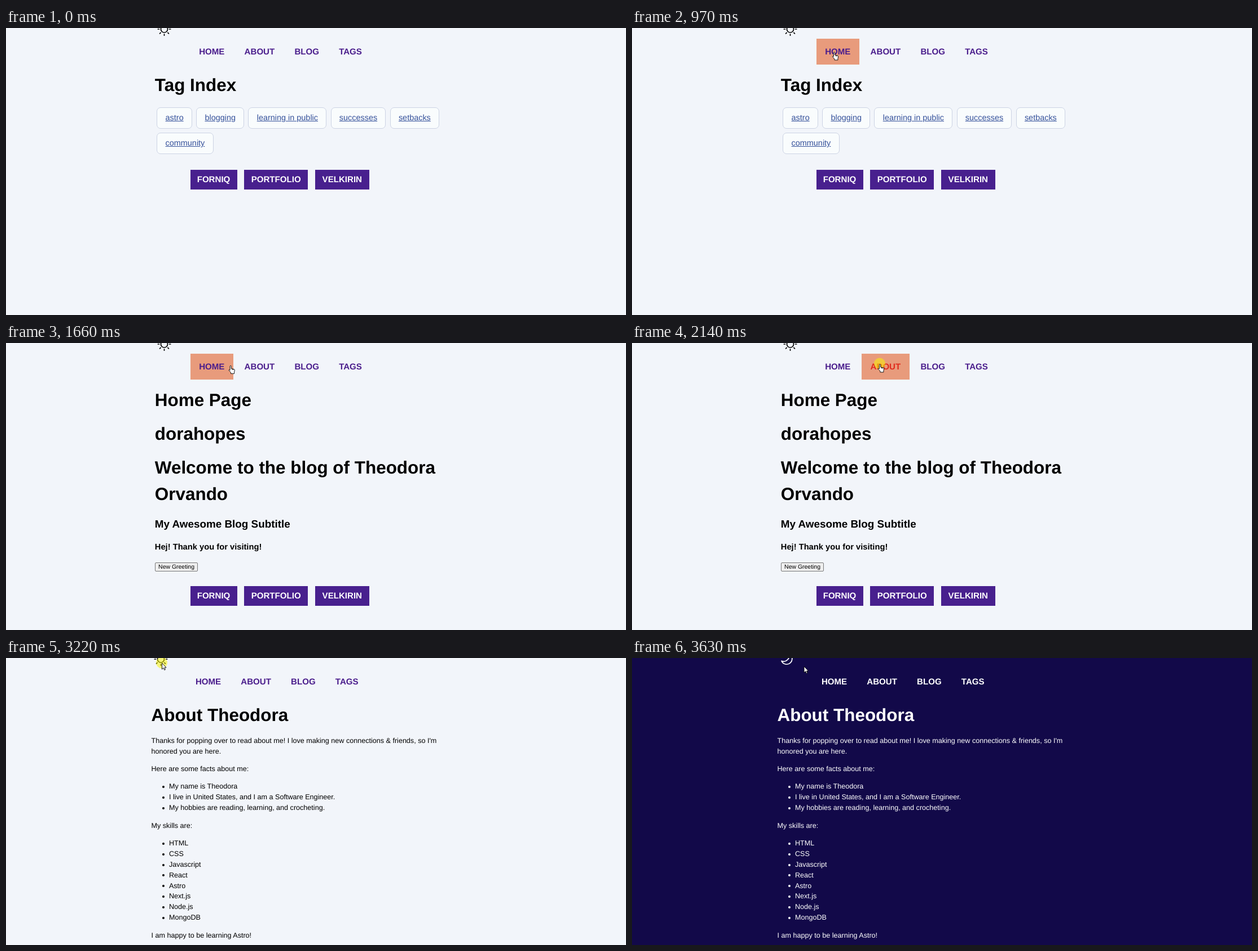
An HTML page for the animation above (3700 ms loop, 1099x510 px).

```html
<!DOCTYPE html>
<html lang="en">
<head>
<meta charset="utf-8">
<title>Blog walkthrough</title>
<style>
  html, body { margin: 0; width: 100%; height: 100%; overflow: hidden; }
  body {
    --ink: #000; --link: #4a1d8c;
    position: relative; background: #f2f5fa; color: var(--ink);
    font: 12.58px/1.5 "Liberation Sans", Arial, sans-serif;
    text-rendering: geometricPrecision;
  }
  body.dark { --ink: #fff; --link: #fff; background: #120949; }
  #page { position: absolute; left: 0; top: 0; width: 1099px; height: 510px; }
  svg { position: absolute; left: 0; top: 0; width: 1099px; height: 510px; overflow: hidden; }
  .icon { fill: none; stroke: var(--ink); stroke-width: 1.7; stroke-linecap: round; stroke-linejoin: round; }
  .dark #sun, body:not(.dark) #moon { display: none; }

  nav, footer { position: absolute; left: 326.5px; display: flex; font-size: 15.08px; font-weight: bold; }
  nav { top: 19.2px; height: 46px; gap: 3.8px; line-height: 47.2px; color: var(--link); }
  nav a { padding: 0 15.7px; }
  nav .hover { background: #e89b7c; }
  nav .active { color: #e02a1c; }
  footer { gap: 12.8px; line-height: 35px; color: #fff; }
  footer a { background: #48208e; text-align: center; }

  main { position: absolute; left: 263.8px; top: 78px; width: 520px; white-space: nowrap; }
  h1 { font-size: 2.5em; margin: 0 0 12.58px; }
  h2 { font-size: 1.5em; margin: 16px 0; }
  h3 { font-size: 1.17em; margin: 0; }
  p, ul { margin: 1em 0; }
  ul { padding-left: 2.5em; list-style: none; }
  li { position: relative; }
  li::before {
    content: ""; position: absolute; left: -11.5px; top: 7.8px;
    width: 4px; height: 4px; border-radius: 50%; background: var(--ink);
  }
  .tags { position: absolute; left: 3.5px; top: 63px; display: flex; flex-wrap: wrap; gap: 7.2px; }
  .tags a {
    padding: 0 14.3px; border: 1px solid #ccd3e4; border-radius: 7px; background: #f9fcfd;
    color: #34509a; font-size: 14.43px; line-height: 36px; text-decoration: underline;
  }
  .greet {
    position: absolute; left: 0; top: 312px; box-sizing: border-box; width: 76.5px; height: 16px;
    border: 1px solid #767676; border-radius: 2px; background: #efefef; color: #000;
    font-size: 10.46px; line-height: 15.5px; text-align: center;
  }
</style>
</head>
<body>
<div id="page">
  <svg class="icon">
    <g id="sun" transform="translate(280.5 2)"><circle r="6"/></g>
    <path id="moon" transform="translate(292.8 -9.8) scale(-1 1)" d="M21.75 15A9.75 9.75 0 1 1 9 2.25 9.75 9.75 0 0 0 21.75 15z"/>
  </svg>
  <nav><a>HOME</a><a>ABOUT</a><a>BLOG</a><a>TAGS</a></nav>

  <main id="tags">
    <h1>Tag Index</h1>
    <div class="tags"><a>astro</a><a>blogging</a><a>learning in public</a><a>successes</a><a>setbacks</a><a>community</a></div>
  </main>

  <main id="home">
    <h1>Home Page</h1>
    <h1>dorahopes</h1>
    <h1>Welcome to the blog of Theodora<br>Orvando</h1>
    <h2>My Awesome Blog Subtitle</h2>
    <h3>Hej! Thank you for visiting!</h3>
    <div class="greet">New Greeting</div>
  </main>

  <main id="about">
    <h1>About Theodora</h1>
    <p>Thanks for popping over to read about me! I love making new connections &amp; friends, so I'm<br>honored you are here.</p>
    <p>Here are some facts about me:</p>
    <ul>
      <li>My name is Theodora</li>
      <li>I live in United States, and I am a Software Engineer.</li>
      <li>My hobbies are reading, learning, and crocheting.</li>
    </ul>
    <p>My skills are:</p>
    <ul><li>HTML</li><li>CSS</li><li>Javascript</li><li>React</li><li>Astro</li><li>Next.js</li><li>Node.js</li><li>MongoDB</li></ul>
    <p>I am happy to be learning Astro!</p>
  </main>

  <footer><a style="width:83px">FORNIQ</a><a style="width:112.7px">PORTFOLIO</a><a style="width:96px">VELKIRIN</a></footer>
</div>

<svg>
  <g id="pointer">
    <circle id="click" cx="-.5" cy="-.5" r="10" fill="#faf500" fill-opacity=".52"/>
    <g fill="#fff" stroke="#000" stroke-width=".9" stroke-linejoin="round">
      <path id="arrow" d="M0 0V11L2.6 8.6 4.3 12.4 6 11.6 4.4 8H7.6Z"/>
      <path id="hand" transform="translate(-3.6 .4)" d="M2.5 1.5a1.1 1.1 0 0 1 2.2 0V5.5L9.5 6.6Q10.8 7 10.8 8.3L10 12V14.5H4V12.5L.6 8.8Q.3 7.4 1.6 7.6L2.5 8.5ZM6.4 6v2M8.3 6.4v1.8"/>
    </g>
  </g>
</svg>

<script>
const LOOP = 3700, HOVER_LAG = 70;
const $ = id => document.getElementById(id);
const show = (el, on) => { el.style.display = on ? '' : 'none'; };
const links = [...document.querySelectorAll('nav a')];
const footer = document.querySelector('footer');

// Pointer moves: first step, last step, number of steps, end point
const START = [1064, 496];
const moves = [
  [70, 590, 8, 505, 27],
  [660, 970, 5, 358.5, 42],
  [1520, 1990, 7, 439.5, 37],
  [2370, 2610, 4, 378, 32],
  [2690, 2990, 5, 276.5, 9],
  [3540, 3630, 2, 305, 15]
];
// Mouse presses: start, page response, end
const clicks = [[1120, 1195, 1270], [2140, 2230, 2300], [3150, 3310, 3310]];

$('sun').insertAdjacentHTML('beforeend', Array.from({ length: 8 }, (_, i) =>
  `<path d="M9 0H11.2" transform="rotate(${i * 45})"/>`).join(''));

function pointerAt(t) {
  let [x, y] = START;
  moves.forEach(([t0, t1, steps, endX, endY], i) => {
    if (t < t0) return;
    const step = Math.min(steps - 1, Math.floor((t - t0) / (t1 - t0) * (steps - 1) + 1e-6));
    const p = i ? (step + 1) / steps : step / (steps - 1);
    const eased = 1 - (1 - p) ** 2;
    x += (endX - x) * eased;
    y += (endY - y) * eased;
  });
  return [x, y];
}

function render(t) {
  const page = t < clicks[0][1] ? 'tags' : t < clicks[1][1] ? 'home' : 'about';
  for (const id of ['tags', 'home', 'about']) show($(id), id === page);
  $('page').style.left = page === 'about' ? '-6.3px' : '0';
  show(footer, page !== 'about');
  footer.style.top = page === 'tags' ? '252px' : '432.4px';
  document.body.classList.toggle('dark', t >= clicks[2][1]);

  const [hoverX, hoverY] = pointerAt(t - HOVER_LAG);
  const pressed = clicks.find(([from, , to]) => t >= from && t < to);
  let hovering = false;
  for (const link of links) {
    const box = link.getBoundingClientRect();
    const over = hoverX >= box.left && hoverX < box.right && hoverY >= box.top && hoverY < box.bottom;
    link.classList.toggle('hover', over);
    link.classList.toggle('active', over && !!pressed && t < pressed[1]);
    hovering ||= over;
  }

  show($('pointer'), t >= moves[0][0]);
  $('pointer').setAttribute('transform', `translate(${pointerAt(t)})`);
  show($('click'), pressed);
  show($('hand'), hovering);
  show($('arrow'), !hovering);
}

const began = performance.now();
function tick() {
  render((performance.now() - began) % LOOP);
  requestAnimationFrame(tick);
}
tick();
</script>
</body>
</html>
```
